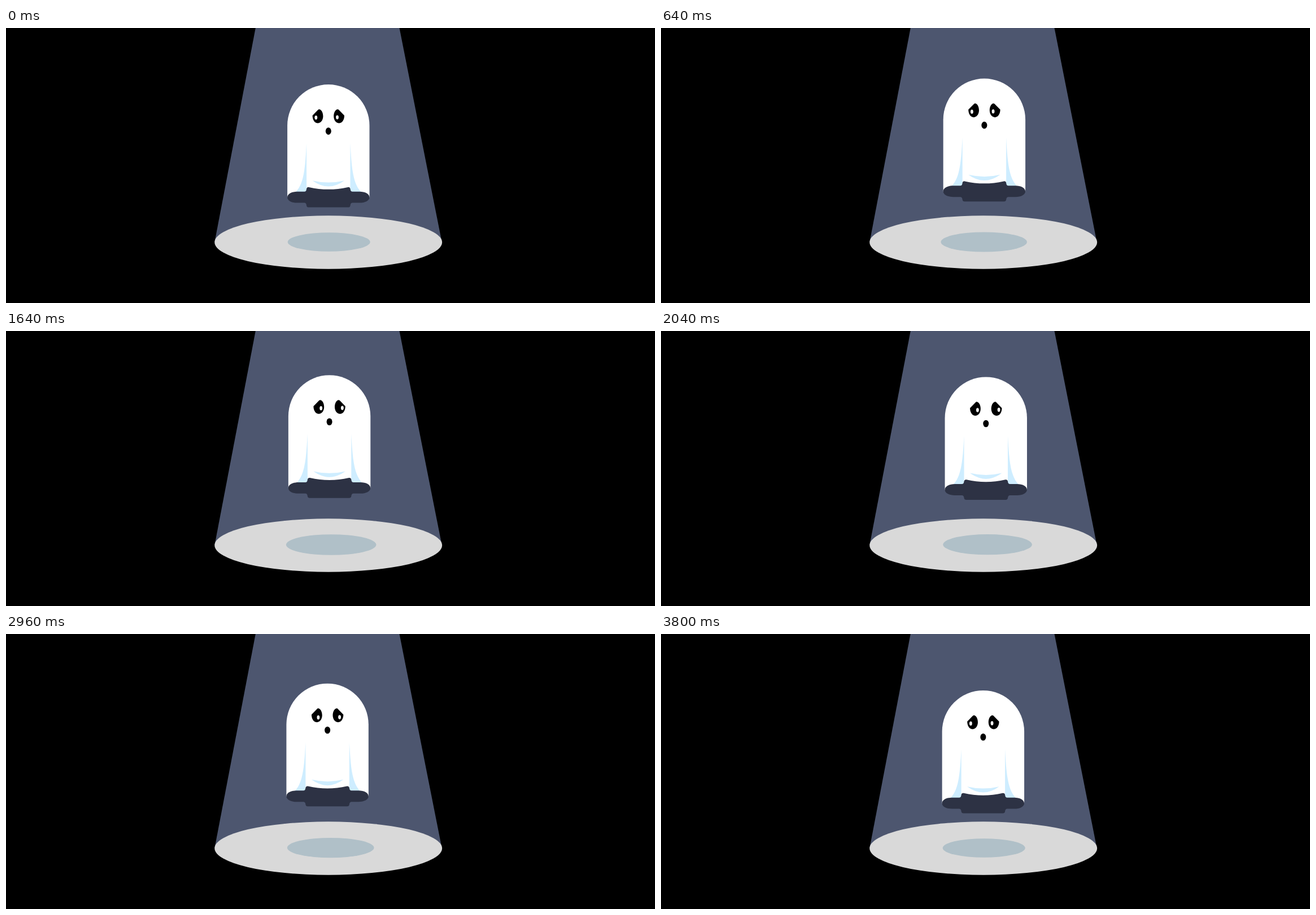
An HTML page that plays this animation: 1149 px wide and 487 px high, repeating every 3.84 s.

```html
<!DOCTYPE html>
<html lang="en">
<head>
<meta charset="utf-8">
<title>Ghost in a spotlight</title>
<style>
  html, body { margin: 0; width: 100%; height: 100%; overflow: hidden; background: #000; }
  svg { display: block; width: 100%; height: 100%; }
</style>
</head>
<body>
<svg viewBox="0 0 1149 487">
  <defs>
    <path id="fold" d="M-38.7 104 V190 H-57.5 C-43 175 -41 146 -38.7 104Z" fill="#ceedff"/>
    <path id="eye" d="M-28.2 55 L-18 44.6 Q-16.6 43.5 -15 44.3 C-11.6 46 -9.4 50.8 -9.4 56.3 C-9.4 63.2 -13.6 68.6 -18.8 68.6 C-24 68.6 -28.2 63 -28.2 55Z"/>
  </defs>
  <path d="M441.8 0 H696.5 L771.6 379 H369.4Z" fill="#4d566f"/>
  <ellipse cx="570.7" cy="379.5" rx="201.4" ry="47.2" fill="#d9d9d9"/>
  <ellipse id="shadow" fill="#b0c0c8"/>
  <g id="ghost">
    <path d="M-72.7 200 V72.7 A72.7 72.7 0 0 1 72.7 72.7 V200Z" fill="#fff"/>
    <use href="#fold"/>
    <use href="#fold" transform="scale(-1 1)"/>
    <path d="M-28.2 170.2 Q0 177 28.2 170.2 Q0 190.8 -28.2 170.2Z" fill="#ceedff"/>
    <path fill="#2d3244" d="M-72.7 199.7 C-72.7 193.8 -65 189.7 -55 189.7 H-42.5 Q-39.3 189.5 -39 186.2 L-38.7 184.7 Q-38 181.3 -34.5 181.9 Q0 189.7 34.5 181.9 Q38 181.3 38.7 184.7 L39 186.2 Q39.3 189.5 42.5 189.7 H55 C65 189.7 72.7 193.8 72.7 199.7 C72.7 205.8 65 209.6 55 209.6 H42.5 Q39.5 209.8 39 212.9 L38.6 214.9 Q38 217.6 35 217.6 H-35 Q-38 217.6 -38.6 214.9 L-39 212.9 Q-39.5 209.8 -42.5 209.6 H-55 C-65 209.6 -72.7 205.8 -72.7 199.7Z"/>
    <use href="#eye"/>
    <use href="#eye" transform="scale(-1 1)"/>
    <ellipse cx="0" cy="82.6" rx="5" ry="6.3"/>
    <g id="pupils" fill="#fff">
      <ellipse cx="-18.45" cy="58.6" rx="2.4" ry="3.7"/>
      <ellipse cx="19.25" cy="58.1" rx="2.4" ry="3.7"/>
    </g>
  </g>
</svg>
<script>
  const LOOP = 3840;
  const [shadow, ghost, pupils] = ['shadow', 'ghost', 'pupils'].map(id => document.getElementById(id));

  // Each leg of the drift is a half turn that bulges sideways on its way to the next start.
  const legs = [
    { at: 0, x: 570.8, y: 100, bulge: 0.5 },
    { at: 600, x: 572.4, y: 89.6, bulge: 0 },
    { at: 1440, x: 570.4, y: 77.7, bulge: 5 },
    { at: 2840, x: 570.4, y: 87.2, bulge: -3.5 }
  ];

  function drift(t) {
    const i = legs.findLastIndex(leg => leg.at <= t);
    const a = legs[i], b = legs[i + 1] || { ...legs[0], at: LOOP };
    const angle = Math.PI * (t - a.at) / (b.at - a.at);
    const u = (1 - Math.cos(angle)) / 2;
    return {
      x: a.x + (b.x - a.x) * u + a.bulge * Math.sin(angle),
      y: a.y + (b.y - a.y) * u
    };
  }

  function smooth(t, from, to) {
    const u = Math.min(1, Math.max(0, (t - from) / (to - from)));
    return u * u * (3 - 2 * u);
  }

  function setAll(node, values) {
    for (const name in values) node.setAttribute(name, values[name]);
  }

  function draw(t) {
    const { x, y } = drift(t);
    setAll(ghost, { transform: `translate(${x} ${y})` });

    // The gaze sweeps right and back along a shallow arc.
    const look = 2 * (smooth(t, 800, 1640) - smooth(t, 2730, 3570)) - 1;
    setAll(pupils, { transform: `translate(${3.55 * look} ${2.5 * (1 - look * look)})` });

    // The shadow grows as the ghost rises and slides right and back.
    const slide = 6.4 * (smooth(t, 1200, 1960) - smooth(t, 2000, LOOP));
    const rx = 73 + 0.31 * (100 - y);
    setAll(shadow, { cx: 571.7 + slide, cy: 379 - slide * 0.13, rx, ry: rx * 0.23 });
  }

  const start = performance.now();
  function tick() {
    draw((performance.now() - start) % LOOP);
    requestAnimationFrame(tick);
  }
  tick();
</script>
</body>
</html>
```
